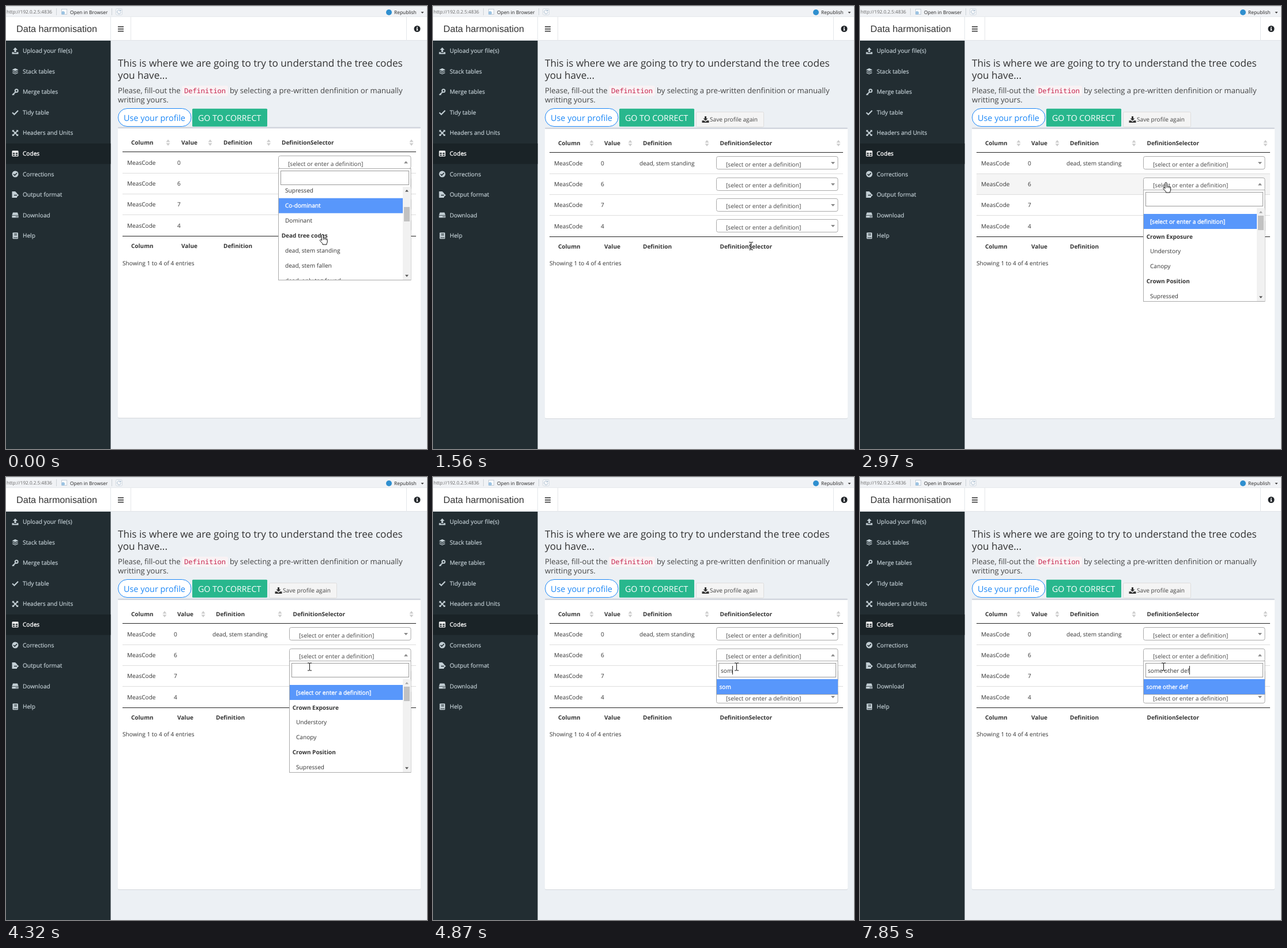
An HTML page that plays this animation: 730 by 767 pixels, repeating every 8000 ms.

```html
<!DOCTYPE html>
<html lang="en">
<head>
<meta charset="utf-8">
<title>Data harmonisation</title>
<style>
  html, body { margin: 0; width: 100%; height: 100%; overflow: hidden; background: #ecf0f4; }
  svg { display: block; }
  text {
    font: 10.1px "Open Sans", "Noto Sans", sans-serif;
    fill: #333;
    white-space: pre;
    text-rendering: geometricPrecision;
  }
  .bold { font-size: 10px; font-weight: 700; }
  .bar { font-size: 8.4px; fill: #222; }
  .url { font-size: 8.13px; fill: #666; }
  .brand { font: 16.15px "Liberation Sans", Arial, sans-serif; }
  .title { font-size: 17.16px; }
  .lead { font-size: 13.1px; fill: #444; }
  .code { font: 12px "Noto Sans Mono", "DejaVu Sans Mono", monospace; fill: #c7254e; }
  .pill { font-size: 14.4px; fill: #1b87f7; }
  .go { font-size: 14.2px; fill: #fff; }
  .menu { fill: #c2ced4; stroke: #c2ced4; stroke-width: .2px; }
  .on { fill: #fff; stroke: #fff; stroke-width: .35px; }
  .soft { fill: #444; }
</style>
</head>
<body>
<svg id="stage" width="730" height="767" viewBox="0 0 730 767">
  <g id="page"></g>
  <g id="live"></g>
  <rect id="caret" y="327" width="1" height="15" fill="#222"/>
  <g id="pointer"></g>
</svg>
<script>
const $ = id => document.getElementById(id);
const text = (x, y, s, cls = '') => `<text x="${x}" y="${y}" class="${cls}">${s}</text>`;
const rect = (x, y, w, h, fill, more = '') =>
  `<rect x="${x}" y="${y}" width="${w}" height="${h}" fill="${fill}" ${more}/>`;
const path = (d, fill, more = '') => `<path d="${d}" fill="${fill}" ${more}/>`;
const hline = (x1, x2, y, c) => path(`M${x1} ${y}H${x2}`, 'none', `stroke="${c}"`);
const vline = (x, y1, y2, c) => path(`M${x} ${y1}V${y2}`, 'none', `stroke="${c}"`);
const tri = (x, y, w, h, c) => path(`M${x - w} ${y}h${2 * w}l${-w} ${h}z`, c);
const at = (x, y, s) => `<g transform="translate(${x} ${y})">${s}</g>`;

const PROMPT = '[select or enter a definition]';
const BLUE = '#5897fb';

// Sidebar icons, each drawn around its own centre
const ink = '#c2ced4', dark = '#222d32';
const stroke = (w, c = ink) => `stroke="${c}" stroke-width="${w}"`;
const icons = {
  upload: path('M0-6L4-1.6H1.5V2.4H-1.5V-1.6H-4zM-5.5 2H-2.5V3.5H2.5V2H5.5V5.5H-5.5z', ink),
  stack: path('M0-5.5L5.5-3 0-.5-5.5-3zM-5.5-.4L-4-1 0 .9 4-1 5.5-.4 0 2.2zM-5.5 2.4L-4 1.8 0 3.7 4 1.8 5.5 2.4 0 5z', ink),
  key: path('M.6.2L-5 5.2M-3.4 3.7l1.4 1.4', 'none', stroke(2)) +
    `<circle cx="2.2" cy="-2" r="2.5" fill="none" ${stroke(2)}/>`,
  check: path('M-5 .2L-1.6 3.5 5-3.4', 'none', stroke(2.1)),
  expand: path('M-5.2-5.2H-1.4L-2.6-4 0-1.4 2.6-4 1.4-5.2H5.2V-1.4L4-2.6 1.4 0 4 2.6 5.2 1.4V5.2H1.4L2.6 4 0 1.4-2.6 4-1.4 5.2H-5.2V1.4L-4 2.6-1.4 0-4-2.6-5.2-1.4z', ink),
  table: rect(-5.5, -5, 11, 10, '#fff', 'rx="1.2"') +
    path('M-4.2-1.4H-.7V.6H-4.2zM.7-1.4H4.2V.6H.7zM-4.2 1.8H-.7V3.8H-4.2zM.7 1.8H4.2V3.8H.7z', '#1a2327'),
  done: `<circle r="5.5" fill="${ink}"/>` + path('M-3 .2L-.8 2.2 3-1.9', 'none', stroke(1.6, dark)),
  send: path('M-5.5-5.5H0L3-2.5V5.5H-5.5z', ink) + path('M-2 1H3', 'none', stroke(1.4, dark)) +
    path('M3-2L6.3 1 3 4z', ink),
  drive: path('M-4-4.5H4L5.6-.2H-5.6zM-5.6.7H5.6V4.5H-5.6z', ink) + rect(1, 2, 1.3, 1.3, dark) + rect(3.2, 2, 1.3, 1.3, dark),
  book: rect(-4.5, -5.5, 9.5, 11, ink, 'rx="1.2"') + path('M-1.8-3H3M-1.8-.9H3M-3 3.4H4.2', 'none', stroke(1, dark))
};
const menu = [
  ['upload', 'Upload your file(s)'], ['stack', 'Stack tables'], ['key', 'Merge tables'],
  ['check', 'Tidy table'], ['expand', 'Headers and Units'], ['table', 'Codes'],
  ['done', 'Corrections'], ['send', 'Output format'], ['drive', 'Download'], ['book', 'Help']
];

function page() {
  let s = rect(0, 0, 730, 767, '#ecf0f4');
  // viewer toolbar
  s += rect(0, 0, 730, 19, '#f0f2f5') + hline(0, 730, .5, '#d5dae0') + hline(0, 730, 18.5, '#e6e9ec');
  s += text(1, 12.7, 'http://192.0.2.5:4836', 'url') + vline(87.5, 4, 16, '#cdd2d7') + vline(183.5, 4, 16, '#cdd2d7');
  s += rect(96.5, 5.5, 9, 9, '#fff', 'stroke="#c3ccd6"') + '<circle cx="99" cy="12" r="3" fill="#9cc3e2"/>';
  s += text(111, 13.6, 'Open in Browser', 'bar') + text(673, 13.9, 'Republish', 'bar');
  s += rect(190.5, 4.5, 11, 11, '#f5f7f9', 'rx="2" stroke="#d3dae2"');
  s += path('M198.5 8A3.3 3.3 0 1 0 199.3 10.6M199.2 6.2V8.6H196.8', 'none', 'stroke="#a9bccf"');
  s += '<circle cx="664" cy="11" r="5" fill="#2f8fcf"/>' + tri(722, 10, 2.5, 3, '#444');
  // navbar
  s += rect(0, 19, 730, 41, '#fff') + hline(0, 730, 59.5, '#dfe3e7');
  for (const x of [181.5, 216.5, 694.5]) s += vline(x, 19, 60, '#e4e7ea');
  s += text(18, 45.3, 'Data harmonisation', 'brand');
  for (const y of [36, 39.8, 43.6]) s += rect(194, y - .8, 10, 1.6, '#333');
  s += '<circle cx="713" cy="39.5" r="5.5" fill="#212529"/>' + rect(712.2, 36, 1.7, 1.7, '#fff') +
    path('M711.4 38.6H713.9V41.6H714.6V42.6H711.4V41.6H712.2V39.6H711.4z', '#fff');
  // sidebar
  s += rect(0, 60, 181.5, 707, dark) + rect(0, 238, 181.5, 35.5, '#1a2327');
  menu.forEach(([icon, label], i) => {
    const y = 77.7 + i * 35.55;
    s += at(16, y, icons[icon]) + text(29, y + 3.5, label, i === 5 ? 'on' : 'menu');
  });
  // heading and buttons
  s += text(194, 105, 'This is where we are going to try to understand the tree codes', 'title');
  s += text(194, 126, 'you have...', 'title');
  s += text(194, 151.2, 'Please, fill-out the', 'lead') + rect(305, 138, 80, 18, '#f9f2f4', 'rx="3"');
  s += text(309, 151.2, 'Definition', 'code');
  s += text(388, 151.2, 'by selecting a pre-written denfinition or manually', 'lead');
  s += text(194, 166.5, 'writting yours.', 'lead');
  s += rect(194.5, 177.5, 126.5, 31, '#fff', 'rx="15.5" stroke="#1b87f7"') + text(204, 198.8, 'Use your profile', 'pill');
  s += rect(323, 177.7, 130, 31, '#28b78d', 'rx="1.5"') + text(333, 198.8, 'GO TO CORRECT', 'go');
  return s;
}

// Column layouts before and after the first definition is set
const layouts = {
  A: { dy: 0, heads: [217, 304, 377, 478], sorts: [281, 354, 455.5, 703], value: 297, left: 472 },
  B: { dy: 1, heads: [217, 297, 364, 497.5], sorts: [275, 342, 475, 703], value: 291, left: 491 }
};
const labels = ['Column', 'Value', 'Definition', 'DefinitionSelector'];
const STEP = 36.35;
const rowY = (L, i) => 271 + L.dy + i * STEP;
const rowTop = (L, i) => Math.floor(252.7 + i * STEP) + L.dy;

function select(L, i, open) {
  const y = Math.floor(rowY(L, i) - 11.2) + .5;
  return rect(L.left + .5, y, 701.5 - L.left, 22, '#fff', 'rx="3" stroke="#aaa"') +
    text(L.left + 17, rowY(L, i) + 5.6, PROMPT, 'soft') +
    (open ? tri(693.5, y + 13, 3.5, -4, '#888') : tri(693.5, y + 9.5, 3.5, 4, '#888'));
}

function table(L, hover, open) {
  const d = L.dy;
  let s = rect(194, 211 + d, 525, 503, '#d3d7dc', 'rx="2"') + rect(194, 210 + d, 525, 503, '#fff', 'rx="2"') +
    rect(194, 209.5 + d, 525, 2.5, '#d2d6de', 'rx="1.2"');
  labels.forEach((name, i) => {
    const x = L.sorts[i], y = 236.5 + d;
    s += text(L.heads[i], 240 + d, name, 'bold') + text(L.heads[i], 418.6 + d, name, 'bold');
    s += tri(x, y - 1, 3.5, -4.5, '#ccc') + tri(x, y + 1, 3.5, 4.5, '#ccc');
  });
  if (hover >= 0) s += rect(202, rowTop(L, hover), 509, STEP, '#f5f5f5');
  for (let i = 0; i < 4; i++) {
    s += hline(202, 711, rowTop(L, i) + .5, i ? '#ddd' : '#222');
    s += text(210, rowY(L, i) + 3.6, 'MeasCode') + text(L.value, rowY(L, i) + 3.6, '0674'[i]);
  }
  s += hline(202, 711, rowTop(L, 4) + .5, '#222');
  if (d) s += text(358, rowY(L, 0) + 3.6, 'dead, stem standing');
  for (let i = 0; i < 4; i++) s += select(L, i, i === open);
  return s + text(202, 448.6, 'Showing 1 to 4 of 4 entries');
}

const listA = ['Supressed', 'Co-dominant', 'Dominant', '#Dead tree codes',
  'dead, stem standing', 'dead, stem fallen', 'dead, only tag found'];
const listB = [PROMPT, '#Crown Exposure', 'Understory', 'Canopy', '#Crown Position', 'Supressed'];

const panel = (x, y, h) => rect(x + .5, y + .5, 701.5 - x, h, '#fff', 'stroke="#aaa"') +
  rect(x + 4.5, y + 4.5, 694 - x, 24, '#fff', 'stroke="#999"');

function dropdown(x, y, items, first, picked, thumb) {
  const top = y + 32, w = 688 - x;
  let s = '';
  items.forEach((name, i) => {
    const mid = first + i * 25.9 - top, head = name[0] === '#', on = i === picked;
    if (on) s += rect(1, mid - 13, w - 1, 26, BLUE);
    s += text(head ? 5.7 : 12, mid + 3.6, head ? name.slice(1) : name, head ? 'bold' : on ? 'on' : '');
  });
  const atTop = items === listB;
  return panel(x, y, 193) + `<svg x="${x}" y="${top}" width="${w}" height="161">${s}</svg>` +
    rect(688, top, 14, 161, '#f1f1f1') + rect(690, thumb, 10, 25, '#c1c1c1') +
    tri(695, top + 8.5, 3, -3.5, atTop ? '#a3a3a3' : '#505050') + tri(695, y + 184.5, 3, 3.5, '#505050');
}

const tagBox = s => panel(491, 318, 58) + rect(492, 350, 210, 26, BLUE) +
  text(496.5, 366.7, s, 'on') + `<text id="typed" x="499" y="338.6">${s}</text>`;

const pointers = {
  hand: path('M-1.5 9V1Q-1.5-.5 0-.5T1.5 1V6Q3 5 4 6.4 5.5 5.5 6.3 7 8.2 6.5 8.2 8.5V12Q8.2 14 7 15.5V17H0V15.5L-4.5 10.5Q-5.2 9-3.8 8.6-2.7 8.5-1.5 10z',
    '#fff', 'stroke="#111" stroke-linejoin="round"') + path('M1.5 6V9M4 6.5V9M6.3 7V9.5', 'none', 'stroke="#111" stroke-width=".8"'),
  beam: path('M-3.5-6.5H-1Q0-6.5 0-5.5V5.5Q0 6.5-1 6.5H-3.5M3.5-6.5H1Q0-6.5 0-5.5M0 5.5Q0 6.5 1 6.5H3.5', 'none', 'stroke="#111"')
};

// Each step changes only the named properties
const steps = [
  [0, { view: 'A', picked: 1, kind: 'hand', x: 549, y: 396, hover: -1, open: 0, typed: '', caret: false }],
  [120, { x: 550, y: 398 }],
  [640, { x: 551, y: 405 }],
  [760, { y: 411, picked: 4 }],
  [880, { y: 416 }],
  [1560, { view: 'B', open: -1, kind: 'beam', x: 551.5, y: 415.5 }],
  [1710, { kind: 'hand', x: 552, y: 382, hover: 3 }],
  [1830, { kind: 'beam', x: 552.5, y: 366.5 }],
  [1980, { kind: 'hand', x: 545, y: 341, hover: 2 }],
  [2110, { x: 532, y: 303, hover: 1 }],
  [2260, { x: 530.5, y: 306 }],
  [2970, { open: 1 }],
  [3400, { y: 312 }],
  [3520, { kind: 'beam', x: 527.5, y: 325.5, hover: -1 }],
  [3640, { x: 526.5, y: 328.5 }],
  [3890, { caret: true }],
  [4320, { caret: false }],
  [4750, { typed: 'so', caret: true }],
  [4870, { typed: 'som' }],
  [5250, { typed: 'some ot' }],
  [5400, { typed: 'some oth' }],
  [5520, { typed: 'some othe' }],
  [5640, { typed: 'some other ' }],
  [6190, { caret: false }],
  [6470, { typed: 'some other d', caret: true }],
  [6590, { typed: 'some other df' }],
  [7050, { typed: 'some other d' }],
  [7200, { typed: 'some other de' }],
  [7700, { caret: false }],
  [7850, { typed: 'some other def', caret: true }]
];
let last = {};
const states = steps.map(([, change]) => last = { ...last, ...change });

function draw(st) {
  let s = table(layouts[st.view], st.hover, st.open);
  if (st.view === 'A') s += dropdown(472, 281, listA, 319.8, st.picked, 348);
  else {
    s += rect(456.5, 183.5, 117, 26, '#f4f4f4', 'rx="2" stroke="#ddd"') + text(480, 200.3, 'Save profile again', 'soft');
    s += at(472.5, 196.5, path('M-1.5-5.5H1.5V-1.8H4L0 2.2-4-1.8H-1.5zM-6 1.8H-2.6L0 4 2.6 1.8H6V5.5H-6z', '#333'));
    if (st.typed) s += tagBox(st.typed);
    else if (st.open === 1) s += dropdown(491, 318, listB, 373, 0, 363);
  }
  $('live').innerHTML = s;
  $('pointer').innerHTML = at(st.x, st.y, pointers[st.kind]);
  const end = st.typed ? $('typed').getComputedTextLength() : 0;
  $('caret').setAttribute('x', 499 + Math.round(end));
  $('caret').style.display = st.caret ? '' : 'none';
}

$('page').innerHTML = page();
let shown = -1;
function tick() {
  const t = performance.now() % 8000;
  const i = steps.findLastIndex(([start]) => start <= t);
  if (i !== shown) draw(states[shown = i]);
  requestAnimationFrame(tick);
}
tick();
</script>
</body>
</html>
```
